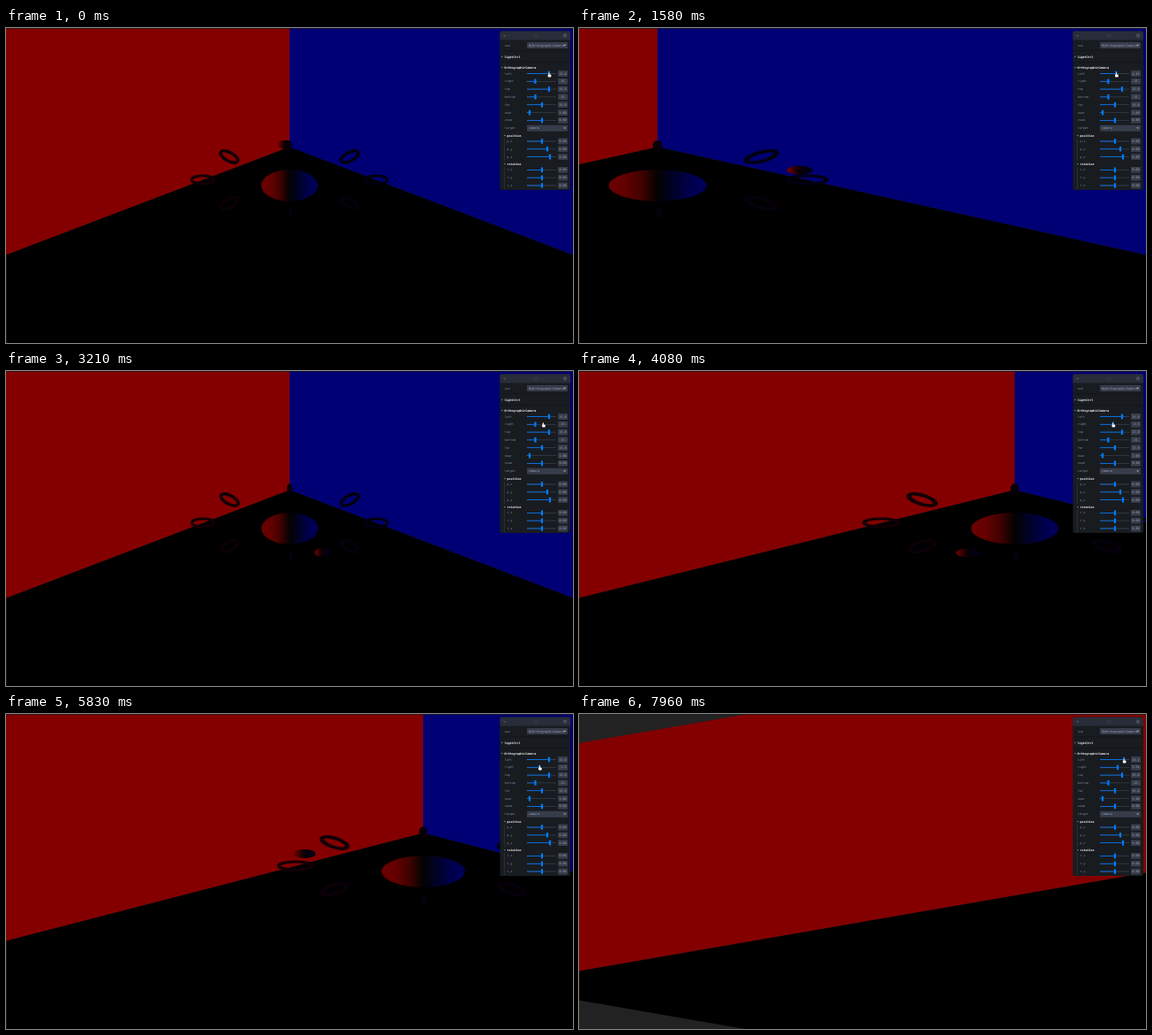
Animation, 640 px wide and 356 px high, one loop 8000 ms. Source, as an HTML page with a canvas:

```html
<!DOCTYPE html>
<html lang="en">
<head>
<meta charset="utf-8">
<title>Orthographic camera controls</title>
<style>
  html, body { margin: 0; width: 100%; height: 100%; overflow: hidden; background: #000; }
  canvas { display: block; width: 100vw; height: 100vh; }
</style>
</head>
<body>
<canvas id="stage" width="640" height="356"></canvas>
<script>
const ctx = document.getElementById('stage').getContext('2d');
const LOOP = 8000, TAU = Math.PI * 2;
const RED = '#840000', BLUE = '#000074', ACCENT = '#007bff', FIELD = '#373c4b';

// Frustum edges in half-widths, keyed as [ms, value].
const leftKeys = [[0, 1], [860, 1], [1580, .161], [1710, .161], [2420, 1.25], [2900, 1.006],
  [3380, 1], [7250, 1], [7960, 1.279]];
const rightKeys = [[0, 1], [3360, 1], [4750, -.323], [4950, -.34], [5550, .45], [5830, .359],
  [6600, -.34], [6850, -.369]];
// Pointer row: 0 is the left slider, 1 the right slider.
const pointerKeys = [[0, 0], [2900, 0], [3210, 1], [6800, 1], [7000, .45], [7250, 0]];

function at(keys, t) {
  const i = keys.findIndex(k => k[0] > t);
  if (i < 0) return keys[keys.length - 1][1];
  if (i === 0) return keys[0][1];
  const [t0, a] = keys[i - 1], [t1, b] = keys[i];
  const u = (t - t0) / (t1 - t0);
  return a + (b - a) * u * u * (3 - 2 * u);
}

function poly(color, ...points) {
  ctx.fillStyle = color;
  ctx.beginPath();
  points.forEach(([x, y]) => ctx.lineTo(x, y));
  ctx.fill();
}

function rect(color, x, y, w, h, r = 0) {
  ctx.fillStyle = color;
  ctx.beginPath();
  ctx.roundRect(x, y, w, h, r);
  ctx.fill();
}

function ring(x, y, rx, ry, tilt, color, width = 3.6) {
  ctx.strokeStyle = color;
  ctx.lineWidth = width;
  ctx.beginPath();
  ctx.ellipse(x, y, rx, ry, tilt, 0, TAU);
  ctx.stroke();
}

function sphere(x, y, rx, ry, colors) {
  const shade = ctx.createLinearGradient(x - rx, 0, x + rx, 0);
  colors.forEach((c, i) => shade.addColorStop(i / (colors.length - 1), c));
  ctx.fillStyle = shade;
  ctx.beginPath();
  ctx.ellipse(x, y, rx, ry, 0, 0, TAU);
  ctx.fill();
}

function drawScene(t, left, right) {
  const scale = 2 / (left + right);
  ctx.fillStyle = '#222';
  ctx.fillRect(0, 0, 640, 356);
  ctx.save();
  // World x is 0 at the room corner; only the horizontal extent is stretched.
  ctx.transform(scale, 0, 0, 1, left * 320 * scale, 0);

  const edge = 320 * Math.SQRT2, back = 134.5, side = back + 122 * Math.SQRT2;
  const height = 257.5;
  for (const [s, color] of [[-1, RED], [1, BLUE]]) {
    poly(color, [0, back], [s * edge, side], [s * edge, side - height], [0, back - height]);
  }
  poly('#000', [0, back], [edge, side], [0, 2 * side - back], [-edge, side]);

  ring(0, 133.5, 1.3, 4.5, 0, '#080008');
  for (const s of [-1, 1]) {
    const dark = s < 0 ? '#120006' : '#030010';
    ring(s * 68, 145.5, 10.8, 4.8, -s * .5, dark);
    ring(s * 98, 171.5, 12.6, 4.6, 0, dark, 3);
    ring(s * 68, 198, 10.5, 4.8, s * .5, s < 0 ? '#0c0008' : '#06000c');
  }
  ring(1, 209, 1, 5, 0, '#06000e', 2);

  const angle = (-93 + 50 * t / 1000) * Math.PI / 180;
  const orb = () => sphere(96 * Math.cos(angle), 170 + 38 * Math.sin(angle), 8.5, 5,
    ['#780000', '#380000', '#080004', '#04000e', '#00001c']);
  if (Math.sin(angle) < 0) orb();
  sphere(0, 178, 32, 17.8, ['#6c0000', '#640000', '#400200', '#040202', '#000228', '#00004c', '#00005c']);
  if (Math.sin(angle) >= 0) orb();
  ctx.restore();

  rect('rgba(28,26,28,.75)', 0, 0, 640, 1);
  rect('rgba(90,40,0,.4)', 0, 0, 1, 356);
}

function label(text, x, y, color = '#8c92a4', bold = false) {
  ctx.font = `${bold ? 'bold ' : ''}3.3px "DejaVu Sans Mono", monospace`;
  ctx.fillStyle = color;
  ctx.fillText(text, x, y + .2);
}

function folder(name, x, y, open = true) {
  const p = open ? [[x - 1, y - .7], [x + 1, y - .7], [x, y + .8]]
                 : [[x - .7, y - 1], [x + .8, y], [x - .7, y + 1]];
  poly('#8c92a4', ...p);
  label(name, x + 2.5, y, '#fff', true);
}

function slider(name, y, handle, value, indent = 0) {
  label(name, 563 + indent, y);
  rect(FIELD, 588, y - .4, 33, .8);
  rect(ACCENT, 588, y - .4, handle - 588, .8);
  rect(ACCENT, handle - 1.1, y - 2.8, 2.2, 5.6, .5);
  rect(FIELD, 623, y - 3.4, 11, 6.8, 1);
  label(value.toFixed(2).slice(0, 4), 624.6, y, '#a4aaba');
}

function select(name, y, value) {
  label(name, 563, y);
  rect(FIELD, 588, y - 3.5, 46, 7, 1);
  label(value, 590, y, '#a4aaba');
  poly('#b4b9c8', [629.2, y - .8], [632.2, y - .8], [630.7, y + .9]);
}

function drawPanel(leftHandle, rightHandle, left, right) {
  rect('#181c20', 557.5, 3.5, 79.5, 179.5, 2);
  rect('#292d39', 557.5, 3.5, 79.5, 10, [2, 2, 0, 0]);
  ctx.strokeStyle = '#70778a';
  ctx.lineWidth = .7;
  ctx.beginPath();
  ctx.moveTo(561.5, 8); ctx.lineTo(562.8, 9.2); ctx.lineTo(564.1, 8);
  ctx.stroke();
  for (let i = 0; i < 6; i++) rect('#535760', 595.5 + i % 3 * 2, 7.5 + (i / 3 | 0) * 2, .8, .8);
  ring(631, 8.5, 1.5, 1.5, 0, '#70778a', .8);

  select('use', 19.5, 'MyOrthographicCamera');
  rect('#101216', 557.5, 25.5, 79.5, .7);
  folder('lightCtrl', 560, 32.5, false);
  rect('#101216', 557.5, 38.5, 79.5, .7);
  folder('OrthographicCamera', 560, 44.8);
  slider('left', 51.5, leftHandle, left * 15);
  slider('right', 60.3, rightHandle, -right * 15);
  slider('top', 69.1, 613, 15);
  slider('bottom', 77.9, 597.5, -15);
  slider('far', 86.7, 605, 15);
  slider('near', 95.6, 591, 1);
  slider('zoom', 104.4, 605, 0);
  select('target', 113.2, 'camera');

  folder('position', 563, 121.8);
  rect(FIELD, 562, 125, .6, 25);
  [['p_x', 605, 0], ['p_y', 611, 6], ['p_z', 614, 8]].forEach(([name, x, value], i) =>
    slider(name, 128 + i * 8.8, x, value, 2.5));
  folder('rotation', 563, 154);
  rect(FIELD, 562, 157, .6, 25);
  ['r_x', 'r_y', 'r_z'].forEach((name, i) => slider(name, 160.4 + i * 8.8, 605, 0, 2.5));
}

function drawPointer(x, y) {
  ctx.strokeStyle = '#111';
  ctx.lineWidth = .7;
  ctx.fillStyle = '#fff';
  ctx.beginPath();
  ctx.roundRect(x - 1.1, y - 2.6, 1.2, 4, .6);
  ctx.roundRect(x - 1.8, y - .3, 3.8, 3, 1);
  ctx.stroke();
  ctx.fill();
}

function draw(now) {
  const t = now % LOOP;
  const left = at(leftKeys, t), right = at(rightKeys, t);
  const leftHandle = 605.2 + 7.8 * left, rightHandle = 605.2 - 7.8 * right;
  drawScene(t, left, right);
  ctx.textBaseline = 'middle';
  drawPanel(leftHandle, rightHandle, left, right);

  const row = at(pointerKeys, t);
  // The pointer rests mid-slider before it grabs the lower handle.
  const grab = at([[0, 9], [3210, 9], [3420, 0]], t);
  const x = leftHandle + (rightHandle + grab - leftHandle) * row;
  drawPointer(x + .4, 52.8 + 8 * row);
}

const start = performance.now();
function tick() {
  draw(performance.now() - start);
  requestAnimationFrame(tick);
}
tick();
</script>
</body>
</html>
```
